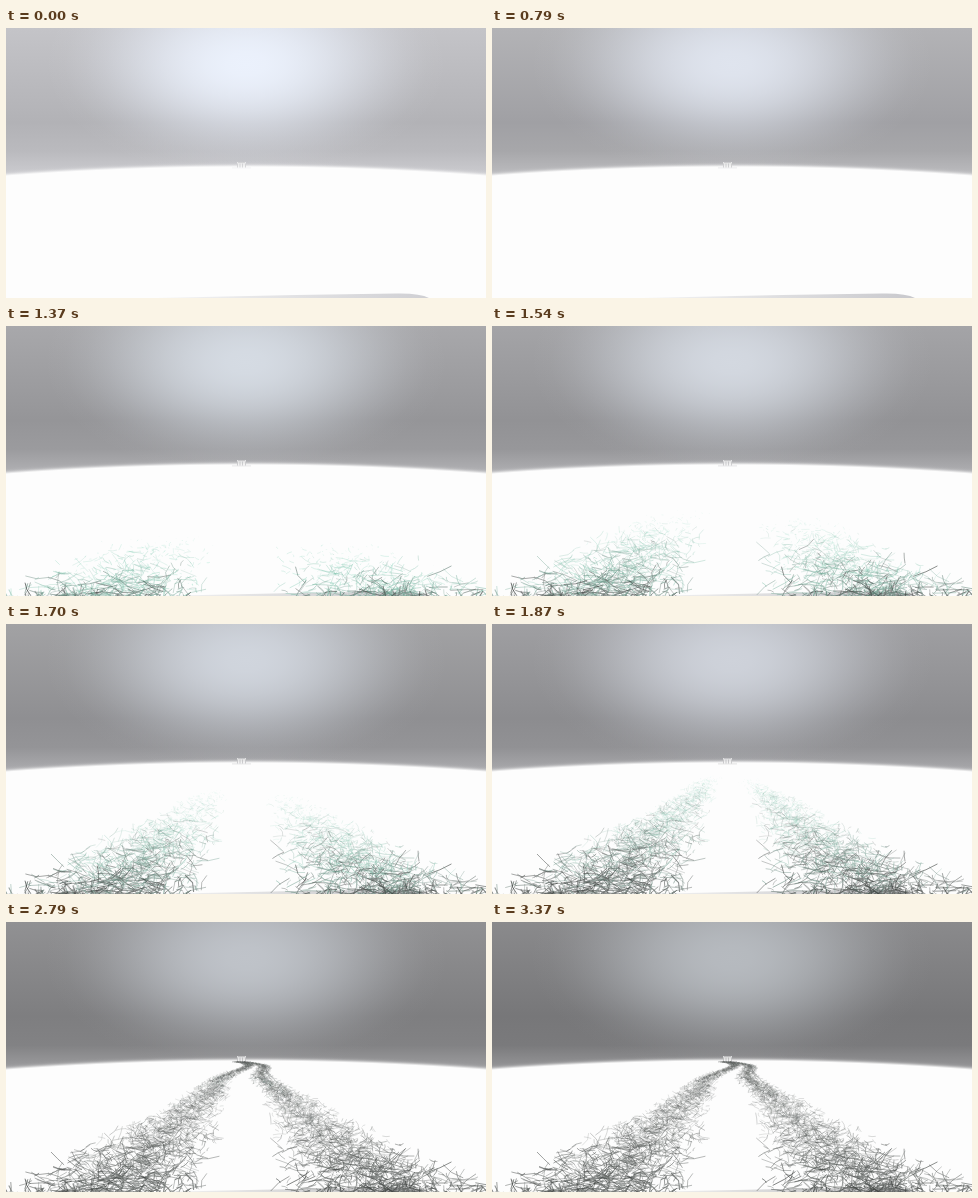
Animation, 480 px wide and 270 px high, one loop 4.05 s. Source, as an HTML page with a canvas:

```html
<!DOCTYPE html>
<html lang="en">
<head>
<meta charset="utf-8">
<title>Growing grass path</title>
<style>
html, body { margin: 0; width: 100%; height: 100%; overflow: hidden; background: #fdfdfd; }
canvas { display: block; width: 480px; height: 270px; }
</style>
</head>
<body>
<canvas id="stage" width="480" height="270"></canvas>
<script>
const ctx = document.getElementById('stage').getContext('2d');
const LOOP = 4050, STILL = 3370;
const CENTER = 240, HORIZON = 137.5;

const clamp = v => Math.max(0, Math.min(1, v));
const lerp = (a, b, k) => a + (b - a) * k;
const mix = (a, b, k) => a.map((v, i) => Math.round(lerp(v, b[i], k)));
const rgb = (a, b, k) => `rgb(${mix(a, b, k)})`;
const gray = (a, b, k) => rgb([a, a, a + 4], [b, b, b + 2], k);

let seed = 7319;
function random() {
  seed = (Math.imul(seed, 1664525) + 1013904223) >>> 0;
  return seed / 4294967296;
}

// Side is -1 or 1; scale is the perspective size, 1 near the viewer and 0 at the horizon.
function makeBlade(side) {
  const scale = 1.12 * Math.exp(-4.2 * random() ** 2);
  const depth = Math.max(0, -Math.log(scale));
  const drift = 10 * Math.sin((depth - 2.25) * 2.1) * clamp(depth - 1.3);
  const halfBand = 5 + 100 * scale ** 1.4;
  const spread = (random() + random() - 1) * 1.12;
  const angle = random() * Math.PI * 2;
  const bend = angle + (random() - 0.5) * 1.1;
  const length = (3 + 14 * random() ** 1.6) * scale + 0.5;
  const shade = 55 + 85 * random();
  return {
    x: CENTER + side * 145 * scale + drift + spread * halfBand,
    y: HORIZON + 131 * scale,
    dx1: Math.cos(angle) * length, dy1: Math.sin(angle) * length * 0.7,
    dx2: Math.cos(bend) * length, dy2: Math.sin(bend) * length * 0.7,
    width: Math.max(0.35, (0.5 + 0.6 * random()) * scale),
    alpha: 0.36 + 0.36 * Math.sqrt(scale),
    color: [shade, shade + 4, shade + 2],
    birth: 830 + 690 * Math.sqrt(depth) + 380 * random() ** 1.3 + (side > 0 ? 40 : 0),
    fade: (200 + 900 * random()) * Math.min(1, 6 * scale)
  };
}

const blades = Array.from({ length: 6000 }, (_, i) => makeBlade(i % 2 ? 1 : -1));
blades.sort((a, b) => a.y - b.y);

function drawSky(u, k) {
  const base = ctx.createLinearGradient(0, 0, 0, 145);
  base.addColorStop(0, gray(196, 138, k));
  base.addColorStop(0.65, gray(178, 119, k));
  base.addColorStop(0.85, gray(186, 122, k));
  base.addColorStop(1, gray(202, 148, k));
  ctx.fillStyle = base;
  ctx.fillRect(0, 0, 480, 150);

  const color = mix([235, 241, 252], [182, 186, 191], u);
  const glow = ctx.createRadialGradient(0, 0, 0, 0, 0, 115);
  const steps = 10;
  for (let i = 0; i <= steps; i++) {
    const at = i / steps;
    glow.addColorStop(at, `rgba(${color},${(1 - at * at) ** 2})`);
  }
  ctx.save();
  ctx.translate(CENTER, 36);
  ctx.scale(1.75, 1);
  ctx.fillStyle = glow;
  ctx.fillRect(-140, -36, 280, 150);
  ctx.restore();
}

function drawGround(k) {
  // A very large disc gives the slightly curved, misty horizon.
  const R = 3200, top = HORIZON + 1.5, depth = 16;
  const mist = ctx.createRadialGradient(CENTER, top + R, R, CENTER, top + R, R + depth);
  const steps = 16;
  for (let i = 0; i <= steps; i++) {
    const at = i / steps;
    mist.addColorStop(at, `rgba(253,253,253,${Math.exp(-26 * at ** 1.7) * (1 - at)})`);
  }
  ctx.fillStyle = mist;
  ctx.fillRect(0, 105, 480, 165);

  const shadow = ctx.createLinearGradient(150, 0, 420, 0);
  shadow.addColorStop(0, '#f4f4f4');
  shadow.addColorStop(1, gray(208, 185, k));
  ctx.fillStyle = shadow;
  ctx.beginPath();
  ctx.moveTo(150, 270);
  ctx.lineTo(290, 267);
  ctx.lineTo(390, 265.5);
  ctx.quadraticCurveTo(414, 265, 423, 270);
  ctx.fill();
}

function drawPavilion(k) {
  ctx.fillStyle = 'rgba(245,245,245,.75)';
  ctx.fillRect(231, 134, 9, 5);
  ctx.fillStyle = gray(195, 165, k);
  ctx.fillRect(232, 134, 7, 0.6);
  for (let i = 0; i < 4; i++) ctx.fillRect(231 + i * 2.7, 135.5, 0.6, 4);
  ctx.globalAlpha = 0.2 + 0.4 * k;
  ctx.fillRect(226, 139.5, 19, 0.8);
  ctx.globalAlpha = 1;
}

function drawBlade(b, t) {
  const age = t - b.birth;
  if (age <= 0) return;
  const grown = clamp(age / 160);
  const aged = clamp(age / b.fade);
  ctx.strokeStyle = rgb([135, 220, 192], b.color, aged);
  ctx.globalAlpha = b.alpha * lerp(0.55, 1, aged);
  ctx.lineWidth = b.width;
  ctx.beginPath();
  ctx.moveTo(b.x - b.dx1 * grown, b.y - b.dy1 * grown);
  ctx.lineTo(b.x, b.y);
  ctx.lineTo(b.x + b.dx2 * grown, b.y + b.dy2 * grown);
  ctx.stroke();
}

function draw() {
  const t = Math.min(performance.now() % LOOP, STILL);
  const u = t / STILL;
  const k = u * (1.35 - 0.35 * u);
  drawSky(u, k);
  drawGround(k);
  drawPavilion(k);
  for (const blade of blades) drawBlade(blade, t);
  ctx.globalAlpha = 1;
  requestAnimationFrame(draw);
}

ctx.lineJoin = 'round';
draw();
</script>
</body>
</html>
```
